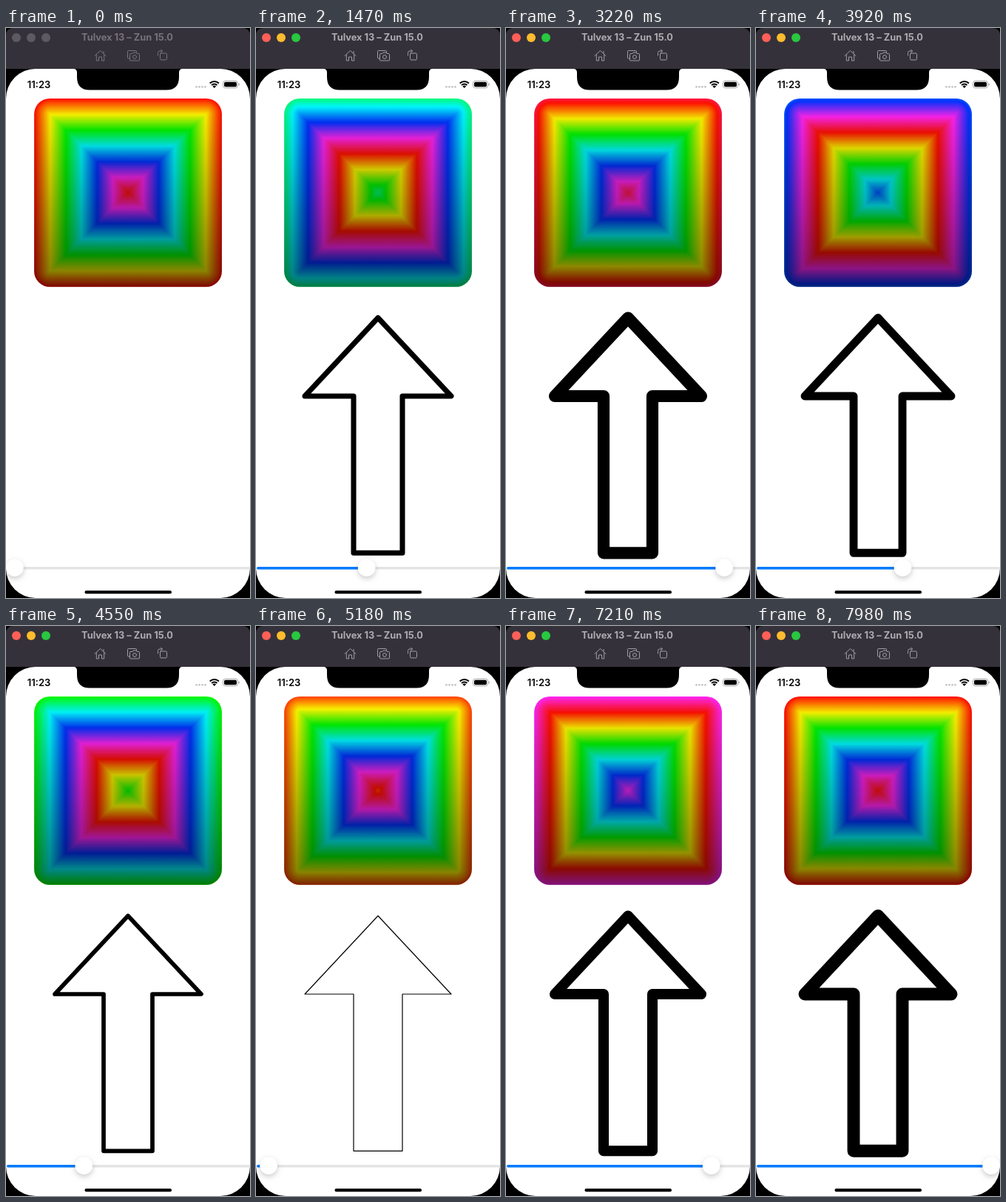
An HTML page with a canvas for the animation above (8000 ms loop, 330x768 px).

```html
<!DOCTYPE html>
<html lang="en">
<head>
<meta charset="utf-8">
<title>Colour cycling demo</title>
<style>
  html, body { margin: 0; width: 100%; height: 100%; overflow: hidden; background: #000; }
  canvas { display: block; width: 330px; height: 768px; }
</style>
</head>
<body>
<canvas id="stage"></canvas>
<script>
const W = 330, H = 768, LOOP = 8000, STEP = 70;
const PT = W / 390; // pixels per device point
const canvas = document.getElementById('stage');
const ctx = canvas.getContext('2d');
const dpr = window.devicePixelRatio || 1;
canvas.width = W * dpr;
canvas.height = H * dpr;

// Slider position over time: [ms, value]
const KEYS = [
  [0, 0], [420, 0], [1470, .45], [2600, 1], [3000, 1], [3220, .925], [4550, .305],
  [5180, .017], [5280, 0], [5680, 0], [6580, .53], [7700, 1], [8000, 1]
];
const HUES = [
  [255, 16, 0], [255, 248, 0], [0, 248, 0],
  [0, 250, 255], [0, 50, 255], [255, 36, 240]
];

const secant = i => (KEYS[i + 1][1] - KEYS[i][1]) / (KEYS[i + 1][0] - KEYS[i][0]);

function slope(i) {
  if (i === 0 || i === KEYS.length - 1) return 0;
  const a = secant(i - 1), b = secant(i);
  return a * b > 0 ? 2 * a * b / (a + b) : 0;
}

// Monotone cubic through the keys
function sliderAt(t) {
  if (t <= 0) return 0;
  let i = 0;
  while (i < KEYS.length - 2 && t >= KEYS[i + 1][0]) i++;
  const [t0, v0] = KEYS[i], [t1, v1] = KEYS[i + 1];
  const d = t1 - t0, u = (t - t0) / d, w = 1 - u;
  return v0 * (1 + 2 * u) * w * w + slope(i) * d * u * w * w
       + v1 * u * u * (3 - 2 * u) - slope(i + 1) * d * u * u * w;
}

function hueColor(h) {
  const x = (h - Math.floor(h)) * 6, i = Math.floor(x) % 6, f = x - Math.floor(x);
  const a = HUES[i], b = HUES[(i + 1) % 6];
  return `rgb(${a.map((v, k) => Math.round(v + (b[k] - v) * f))})`;
}

function roundRect(x, y, w, h, r) {
  ctx.beginPath();
  ctx.moveTo(x + r, y);
  ctx.arcTo(x + w, y, x + w, y + h, r);
  ctx.arcTo(x + w, y + h, x, y + h, r);
  ctx.arcTo(x, y + h, x, y, r);
  ctx.arcTo(x, y, x + w, y, r);
  ctx.closePath();
}

function fillRound(x, y, w, h, r, color) {
  roundRect(x, y, w, h, r);
  ctx.fillStyle = color;
  ctx.fill();
}

function disc(x, y, r, color) {
  ctx.beginPath();
  ctx.arc(x, y, r, 0, Math.PI * 2);
  ctx.fillStyle = color;
  ctx.fill();
}

function label(text, x, y, font, color, align) {
  ctx.font = font + ' Inter, Roboto, sans-serif';
  ctx.textAlign = align;
  ctx.fillStyle = color;
  ctx.fillText(text, x, y);
}

const ICONS = new Path2D(
  'M120 37.5L127.5 30.5L135 37.5M122.3 36V44H125.5V39H129.5V44H132.7V36M132 34V31.5' +
  'M167 41H165.5Q164.5 41 164.5 40V31.5Q164.5 30.5 165.5 30.5H175.5Q176.5 30.5 176.5 31.5V33' +
  'M168.5 34.5H171L172 33H176L177 34.5H179.5Q180.5 34.5 180.5 35.5V43Q180.5 44 179.5 44H168.5Q167.5 44 167.5 43V35.5Q167.5 34.5 168.5 34.5Z' +
  'M176.5 39A2.5 2.5 0 1 1 171.5 39A2.5 2.5 0 1 1 176.5 39' +
  'M209.5 34H216Q217.5 34 217.5 35.5V41.5Q217.5 43 216 43H210Q208.5 43 208.5 41.5V35Q208.5 34 209.5 34Z' +
  'M205.5 37V33.5Q205.5 31 208 31H211.5M209.5 29L211.5 31L209.5 33'
);

function drawWindow(active) {
  ctx.fillStyle = '#000';
  ctx.fillRect(0, 0, W, H);
  fillRound(0, 0, W, 70, 9, '#35313a');
  ctx.fillStyle = '#000';
  ctx.fillRect(0, 55, W, H - 55);
  const lights = active ? ['#ff5f57', '#febc2e', '#28c840'] : Array(3).fill('#5e5a62');
  lights.forEach((c, i) => disc(14 + 20 * i, 13, 6, c));
  label('Tulvex 13 – Zun 15.0', 164, 17.4, '700 12.8px', active ? '#aeabb1' : '#77737b', 'center');
  ctx.strokeStyle = active ? '#a09ca3' : '#78747c';
  ctx.lineWidth = 1;
  ctx.lineJoin = ctx.lineCap = 'round';
  ctx.stroke(ICONS);
}

function drawScreen() {
  fillRound(0, 55, W, H - 55, 40, '#fff');
  ctx.fillStyle = '#000';
  ctx.fill(new Path2D('M91 55Q96 55 96 60V66Q96 83.5 113 83.5H217Q234 83.5 234 66V60Q234 55 239 55Z'));
}

function drawStatus() {
  label('11:23', 44.5, 80.7, '600 13px', '#000', 'center');
  for (let i = 0; i < 4; i++) disc(257.5 + 4 * i, 79.3, 1.4, '#c4c4c6');

  ctx.strokeStyle = '#000';
  ctx.lineCap = 'butt';
  ctx.lineWidth = 2;
  for (const r of [5.2, 8.6]) {
    ctx.beginPath();
    ctx.arc(281.8, 80.6, r, -Math.PI * .75, -Math.PI * .25);
    ctx.stroke();
  }
  ctx.fillStyle = '#000';
  ctx.fill(new Path2D('M281.8 81L279.4 78.5Q281.8 76.6 284.2 78.5Z'));

  roundRect(293.5, 71.2, 20, 9.6, 3);
  ctx.strokeStyle = '#a3a3a5';
  ctx.lineWidth = .9;
  ctx.stroke();
  fillRound(295, 72.7, 17, 6.6, 1.7, '#000');
  fillRound(314.6, 74.4, 1.2, 3.2, .6, '#a3a3a5');
}

function drawRings(amount) {
  const x = 38.1, y = 94.9, size = 300 * PT, radius = 25 * PT, steps = 100;
  for (let i = 0; i < steps; i++) {
    const inset = i * size / 2 / steps, side = size - 2 * inset;
    fillRound(x + inset, y + inset, side, side, Math.max(0, radius - inset), hueColor(i / steps + amount));
  }
  const shade = ctx.createLinearGradient(0, y, 0, y + size);
  shade.addColorStop(0, 'rgba(0,0,0,0)');
  shade.addColorStop(1, 'rgba(0,0,0,.5)');
  fillRound(x, y, size, size, radius, shade);
}

const ARROW = new Path2D('M165 390.5L264 496H198V707.3H132V496H66Z');

function drawArrow(amount) {
  if (amount < .001) return;
  ctx.strokeStyle = '#000';
  ctx.lineWidth = Math.max(1.2, 20 * PT * amount);
  ctx.lineJoin = ctx.lineCap = 'round';
  ctx.stroke(ARROW);
}

function drawSlider(value) {
  const r = 14 * PT, x = r + value * (W - 2 * r), y = 727.7;
  fillRound(1, y - 1.7, W - 1, 3.4, 1.7, '#e4e4e5');
  if (value > .001) fillRound(1, y - 1.7, x, 3.4, 1.7, '#007aff');
  ctx.save();
  ctx.shadowColor = 'rgba(0,0,0,.2)';
  ctx.shadowBlur = 7 * dpr;
  ctx.shadowOffsetY = 3 * dpr;
  disc(x, y - .5, r, '#fff');
  ctx.restore();
}

function draw(now) {
  const t = Math.floor((now % LOOP) / STEP) * STEP;
  const amount = sliderAt(t - STEP); // drawing trails the thumb by one step
  ctx.setTransform(dpr, 0, 0, dpr, 0, 0);
  drawWindow(t >= STEP);
  drawScreen();
  drawStatus();
  drawRings(amount);
  drawArrow(amount);
  ctx.save();
  roundRect(0, 55, W, H - 55, 40);
  ctx.clip();
  drawSlider(sliderAt(t));
  ctx.restore();
  fillRound(106.5, 758, 117.5, 4.3, 2.1, '#000');
}

const start = performance.now();
function tick() {
  draw(performance.now() - start);
  requestAnimationFrame(tick);
}
tick();
</script>
</body>
</html>
```
